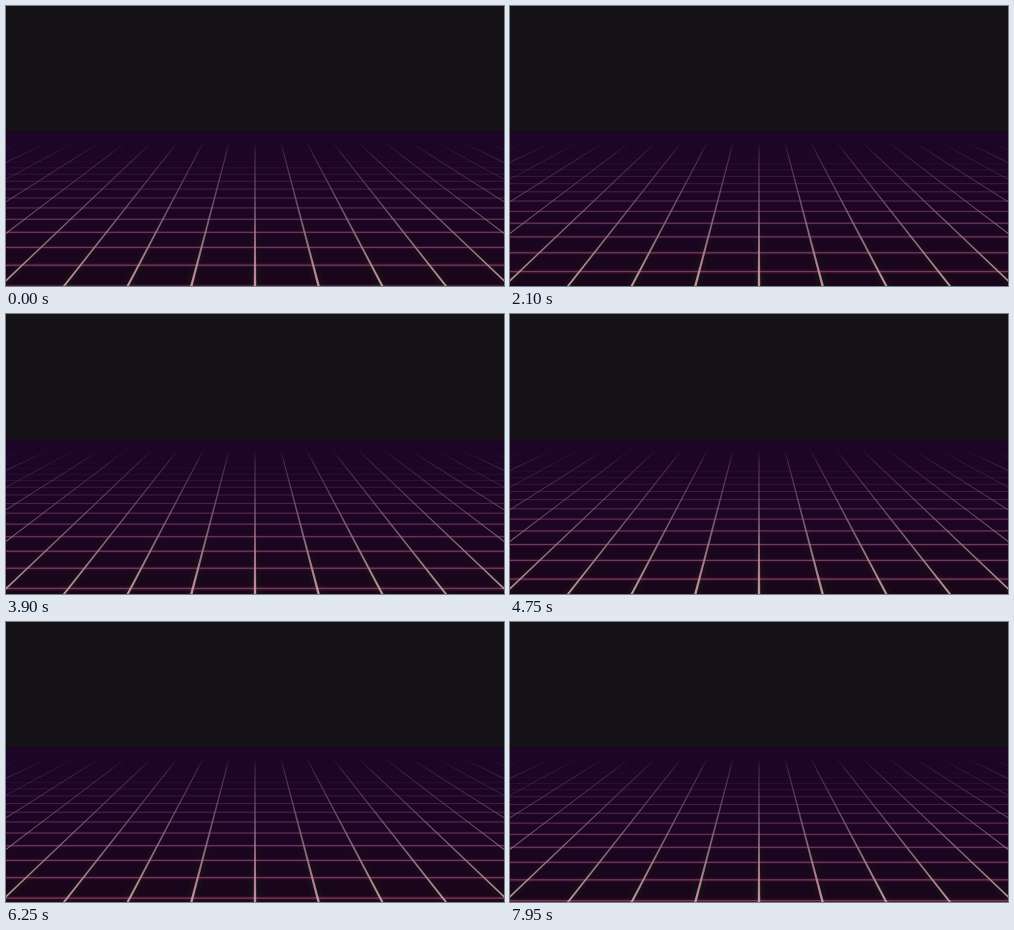
An HTML page with a canvas that plays this animation: 498x280 px, repeating every 8000 ms.

```html
<!DOCTYPE html>
<html lang="en">
<head>
<meta charset="utf-8">
<title>Neon grid</title>
<style>
  html, body { margin: 0; width: 100%; height: 100%; overflow: hidden; background: #141214; }
  canvas { display: block; }
</style>
</head>
<body>
<canvas id="stage" width="498" height="280"></canvas>
<script>
const ctx = document.getElementById('stage').getContext('2d');
const W = 498, H = 280, CENTER = 249;
const VANISH = 38;      // height where all lines would meet
const FLOOR = 125;      // visible far edge of the floor
const SPREAD = 0.263;   // sideways slope between neighbouring lines
const DEPTH = 2531.6;   // screen distance of the row at depth 1
const STEP = 50, LOOP = 8000;
const ROWS_PER_MS = 0.00301, START = 0.445;

function verticalGradient(y0, y1, stops) {
  const gradient = ctx.createLinearGradient(0, y0, 0, y1);
  for (const [at, color] of stops) gradient.addColorStop(at, color);
  return gradient;
}

const floorFill = verticalGradient(FLOOR, H, [
  [0, '#190821'], [0.02, '#1c0526'], [0.5, '#1c0525'], [1, '#19061a']
]);
const lineFill = verticalGradient(134, H, [
  [0, 'rgba(95,65,110,0)'], [0.1, 'rgba(105,75,115,.55)'],
  [0.45, 'rgba(145,100,138,.75)'], [1, 'rgba(218,160,178,.9)']
]);
const fringeFill = verticalGradient(190, H, [
  [0, 'rgba(22,24,16,0)'], [1, 'rgba(22,24,16,.5)']
]);

// A floor line that widens towards the viewer
function drawColumn(index, width, fill) {
  const edge = (y, side) => CENTER + (y - VANISH) * (index * SPREAD + side * width / (2 * (H - VANISH)));
  ctx.fillStyle = fill;
  ctx.beginPath();
  ctx.moveTo(edge(FLOOR, -1), FLOOR);
  ctx.lineTo(edge(FLOOR, 1), FLOOR);
  ctx.lineTo(edge(H, 1), H);
  ctx.lineTo(edge(H, -1), H);
  ctx.fill();
}

function drawRow(y) {
  const near = (y - VANISH) / (H - VANISH);
  const fade = Math.min(1, Math.max(0, (y - 145) / 75));
  const bar = (height, color) => {
    ctx.fillStyle = color;
    ctx.fillRect(0, y - height / 2, W, height);
  };
  bar(5 * near * near, `rgba(95,30,60,${0.22 * fade})`);
  bar(0.7 + 0.7 * near * near, `rgba(${115 + 45 * near},85,125,${0.65 * fade})`);
}

function draw(time) {
  ctx.fillStyle = '#141214';
  ctx.fillRect(0, 0, W, H);
  ctx.fillStyle = floorFill;
  ctx.fillRect(0, FLOOR, W, H);

  const travel = START - time * ROWS_PER_MS;
  const phase = travel - Math.floor(travel);
  const columns = Array.from({ length: 23 }, (_, i) => i - 11);

  for (const i of columns) drawColumn(i, 12, fringeFill);
  for (let row = 10; row < 25; row++) drawRow(VANISH + DEPTH / (row + phase));
  for (const i of columns) drawColumn(i, 2.4, lineFill);
}

function frame() {
  draw(Math.floor(performance.now() % LOOP / STEP) * STEP);
  requestAnimationFrame(frame);
}
frame();
</script>
</body>
</html>
```
